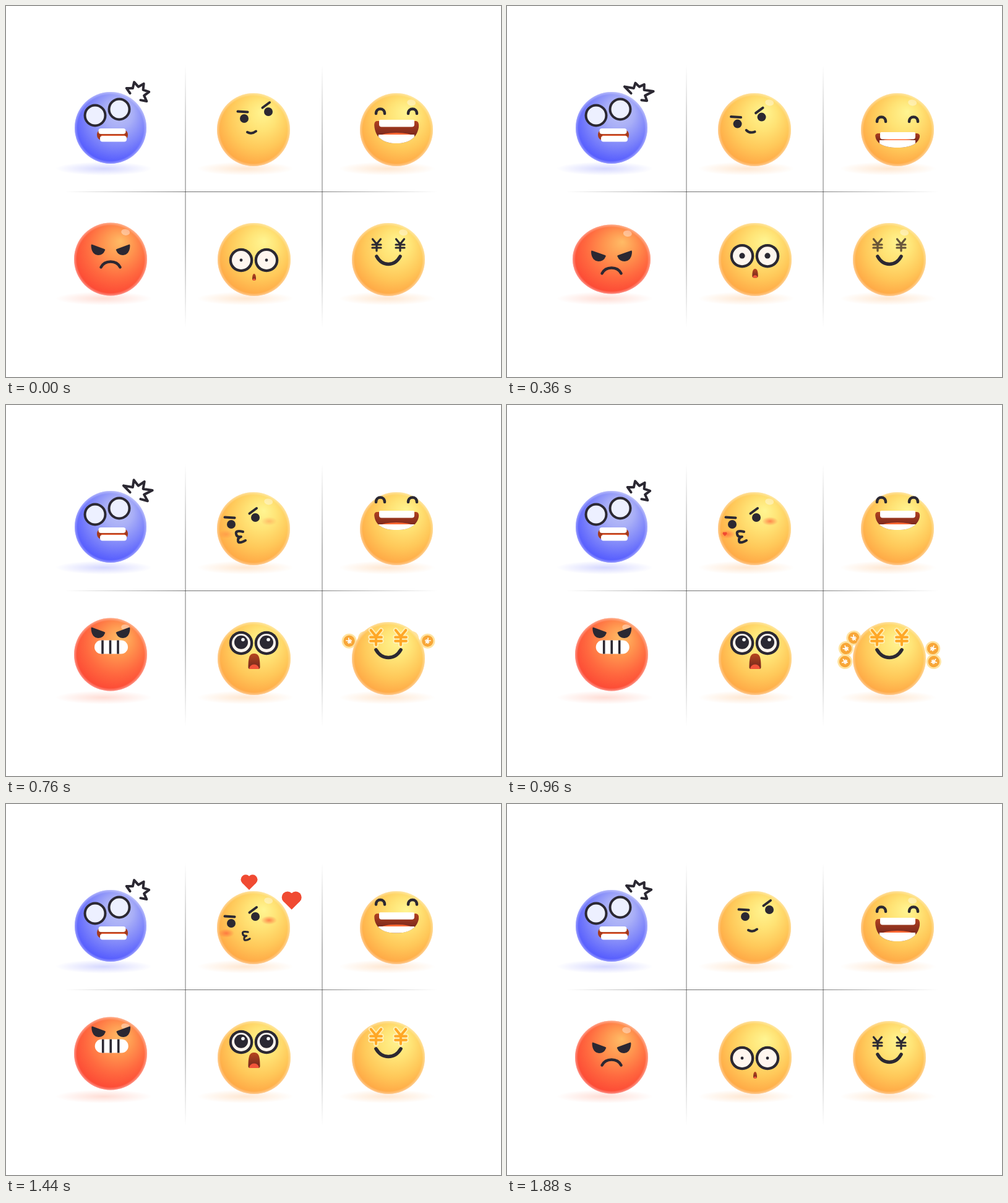
Recreate the animation shown at these times as an HTML page with a canvas. Size 800 px wide and 600 px high, loop 1.92 s.

```html
<!DOCTYPE html>
<html lang="en">
<head>
<meta charset="utf-8">
<title>Six moods</title>
<style>
html, body { margin: 0; width: 100%; height: 100%; overflow: hidden; background: #fff; }
canvas { display: block; width: 800px; height: 600px; }
</style>
</head>
<body>
<canvas id="stage" width="800" height="600"></canvas>
<script>
const ctx = document.getElementById('stage').getContext('2d');
const LOOP = 1920, STEP = 40, TAU = 2 * Math.PI, INK = '#2b2832', GOLD = '#ffa726';
const YELLOW = ['#fff592', '#ffe375', '#ffc859', '#ffa342'];
const BLUE = ['#c0c5f6', '#a8aef7', '#7d84fa', '#4d54ff'];
const RED = ['#ffbc66', '#ff954f', '#ff693f', '#fc4433'];

// Smooth step from 0 at time a to 1 at time b.
function ease(t, a, b) {
  const p = Math.min(1, Math.max(0, (t - a) / (b - a)));
  return p * p * (3 - 2 * p);
}
const pulse = (t, a, b, c, d) => ease(t, a, b) - ease(t, c, d);
const mix = (a, b, p) => a + (b - a) * p;

function at(x, y, draw, { rot = 0, sx = 1, sy = sx, alpha = 1 } = {}) {
  if (alpha <= 0) return;
  ctx.save();
  ctx.translate(x, y);
  ctx.rotate(rot);
  ctx.scale(sx, sy);
  ctx.globalAlpha *= alpha;
  draw();
  ctx.restore();
}

function fill(d, color) {
  ctx.fillStyle = color;
  ctx.fill(new Path2D(d));
}

function line(d, width = 4, color = INK) {
  ctx.lineCap = ctx.lineJoin = 'round';
  ctx.lineWidth = width;
  ctx.strokeStyle = color;
  ctx.stroke(new Path2D(d));
}

function oval(x, y, rx, ry, color, rot = 0) {
  ctx.beginPath();
  ctx.ellipse(x, y, rx, ry, rot, 0, TAU);
  ctx.fillStyle = color;
  ctx.fill();
}

const dot = (x, y, r, color) => oval(x, y, r, r, color);

function box(x, y, w, h, r, color) {
  ctx.beginPath();
  ctx.roundRect(x, y, w, h, r);
  ctx.fillStyle = color;
  ctx.fill();
}

function shade(gradient, ...colors) {
  colors.forEach((c, i) => gradient.addColorStop(i / (colors.length - 1), c));
  return gradient;
}

const down = (top, end, ...colors) => shade(ctx.createLinearGradient(0, top, 0, end), ...colors);

function clipped(d, color, draw) {
  ctx.save();
  fill(d, color);
  ctx.clip(new Path2D(d));
  draw();
  ctx.restore();
}

function glow(x, y, rx, ry, rgb, alpha) {
  at(x, y, () => dot(0, 0, 1, shade(ctx.createRadialGradient(0, 0, 0, 0, 0, 1),
    `rgba(${rgb},${alpha})`, `rgba(${rgb},${alpha / 2})`, `rgba(${rgb},0)`)), { sx: rx, sy: ry });
}

function ball(x, y, colors, { rx = 59, ry = rx, shine = 0 } = {}) {
  at(x, y, () => {
    dot(0, 0, 1, shade(ctx.createRadialGradient(.28, -.5, 0, .1, -.2, 1.25), ...colors));
    // A pale rim softens the edge.
    dot(0, 0, 1, shade(ctx.createRadialGradient(0, 0, .92, 0, 0, 1), 'rgba(255,255,255,0)', 'rgba(255,255,255,.4)'));
  }, { sx: rx, sy: ry });
  oval(x + rx * .41, y - ry * .74, 7, 5, `rgba(255,255,255,${shine * .38})`, .15);
}

function grid() {
  const clear = 'rgba(40,40,40,0)', dark = 'rgba(40,40,40,.65)';
  const rule = (x, y, length, rot) => at(x, y, () => {
    ctx.fillStyle = shade(ctx.createLinearGradient(0, 0, length, 0), clear, dark, dark, clear);
    ctx.fillRect(0, -.5, length, 1);
  }, { rot });
  rule(95, 300.5, 602, 0);
  rule(290, 95, 425, TAU / 4);
  rule(511, 95, 425, TAU / 4);
}

function burst(t) {
  const pts = [];
  for (let i = 0; i < 11; i++) {
    const tip = i >> 1, a = (184 + 23.8 * i) * TAU / 360;
    const beat = Math.cos(TAU * (t / 480 - (tip % 3 ? 1 : 2) / 3));
    const r = i % 2 ? 21.5 + 4 * beat : 11.5;
    pts.push(212 + r * Math.cos(a), 142 + r * Math.sin(a));
  }
  line('M' + pts.join(' '));
}

function dizzy(t) {
  ball(169, 197, BLUE, { rx: 58 });
  for (const [x, y] of [[144, 177], [183, 167]]) {
    dot(x, y, 18.5, INK);
    dot(x, y, 14.5, '#edf0ff');
  }
  box(147, 200, 50, 17, 8, '#a43a1c');
  box(154, 208, 38, 3, 1, '#d9532a');
  box(149.5, 198, 44, 9, 4, '#fff');
  box(152, 210, 43, 9.5, 4, '#fff');
  burst(t);
}

function heart(x, y, w) {
  at(x, y, () => {
    const color = '#f04a32';
    dot(-.207, -.147, .293, color);
    dot(.207, -.147, .293, color);
    fill('M0 -.354L.414 .06L0 .474L-.414 .06Z', color);
  }, { sx: w });
}

// Two hearts leave the lips and circle the face, speeding up, then slip behind it.
function hearts(t, behind) {
  for (const [delay, size] of [[0, 32], [155, 27]]) {
    const u = t - 965 - delay;
    if (u < -120 || u > 720 || (u > 520) !== behind) continue;
    const a = (171 + .23 * u + .000195 * u * u) * TAU / 360;
    const hide = 1 - ease(u, 640, 720);
    const r = mix(43, 76, ease(u, -150, 400)) * mix(.4, 1, hide);
    heart(400 + r * Math.cos(a), 200 + r * Math.sin(a), size * ease(u, -120, 260) * hide);
  }
}

function kiss(t) {
  hearts(t, true);
  ball(400, 200, YELLOW, { shine: pulse(t, 120, 340, 1460, 1640) });
  const blush = .8 * pulse(t, 560, 1000, 1440, 1680);
  for (const [x, y] of [[425, 188], [356, 209]]) glow(x, y, 13, 7, '255,105,60', blush);

  const turn = pulse(t, 180, 500, 1440, 1600), dip = pulse(t, 130, 460, 1440, 1720);
  at(385 - 21 * turn, 182 + 11 * dip, () => {
    dot(0, 0, 7, INK);
    dot(39, -11, 7, INK);
    line('M-10.5 -11.5L5.5 -10.5M29.5 -17.5L41 -26');
  });
  if (t >= 480 && t < 1560) {
    at(379 + 9 * ease(t, 1200, 1440), 214, () =>
      line('M4 -9Q-9 -12 -7 -5Q-6 0 1 -1Q-5 1 -4 6Q-3 11 8 5'),
      { sx: mix(.5, 1, pulse(t, 480, 640, 1200, 1700)) });
  } else {
    const bend = t < 480 ? turn : 0;
    at(397 - 6 * bend, 204 - 2 * bend, () => line('M-7 0Q0 4 7 -1.5'),
      { rot: .5 * bend, alpha: 1 - pulse(t, 400, 480, 1540, 1680) });
  }
  hearts(t, false);
}

function laugh(t) {
  const shut = pulse(t, 60, 340, 400, 680), lift = pulse(t, 400, 680, 1240, 1760);
  ball(631, 200, YELLOW, { shine: 1 - lift });
  const eyes = 13 * shut - 17 * lift;
  at(605, 174 + eyes, () => line('M-7 0C-7 -10 7 -10 7 0M45 0C45 -10 59 -10 59 0', 4.5));

  const top = 184 + 20 * shut - 13 * lift, end = 222 + 7 * shut - 20 * lift;
  const bite = 208 + 9 * shut - 15 * lift, side = mix(top, end, .32), low = mix(top, end, .8);
  const mouth = `M599 ${top + 2}H663Q668 ${top + 3} 667 ${side}C664 ${low} 650 ${end} 631 ${end}S598 ${low} 595.5 ${side}Q594 ${top + 3} 599 ${top + 2}Z`;
  clipped(mouth, down(top, bite, '#b54320', '#7e2a1e'), () => {
    oval(631, bite + 2, 25, 5, '#ff6a35');
    fill(`M602 ${bite}H660Q652 ${end} 631 ${end}T602 ${bite}Z`, '#fff');
    fill(`M602 ${bite}H660V${end}H602Z`, '#fff');
  });
  box(603, top, 57, 11.5, [2, 2, 4, 4], '#fff');
}

function angry(t) {
  const squash = pulse(t, 120, 340, 400, 540), rage = pulse(t, 420, 600, 1640, 1840);
  ball(169, 409.5 - 6 * rage, RED, { rx: 59 + 4 * squash, ry: 59 - 3 * squash, shine: 1 });
  const x = 169 - 1.4 * rage * Math.cos(TAU * (t - 1120) / 96);
  at(x, 387 + 10 * squash - 26 * rage, () => {
    for (const side of [1, -1])
      at(0, 0, () => fill('M-31 -.5Q-32 -2 -29 -1L-10 6Q-8 7 -9 8Q-12 16 -20 16Q-31 15 -31.5 0Z', INK),
        { sx: side * (1 + .05 * squash), sy: 1 });
    if (rage < .5) line('M-15.5 35.5Q-11 26.5 0 26.5T15.5 35.5', 4.5);
  });
  if (rage >= .5) {
    const h = 22 * pulse(t, 440, 620, 1480, 1840);
    at(x + 1, 391.5, () => {
      box(-27, -h / 2, 54, h, h / 2, '#fff');
      for (let bar = -1; bar < 2; bar++) box(12.5 * bar - 3.3, -h / 2, 3.6, h, 0, INK);
    });
  }
}

function shock(t) {
  ball(401, 410, YELLOW);
  const open = pulse(t, 200, 680, 1440, 1800), eye = 411 - 26 * open;
  for (const x of [380, 421]) {
    dot(x, eye, 19.3, INK);
    dot(x, eye, 15, '#fff6ef');
    dot(x, eye - 1.2 * open, 2.4 + 8.6 * open, INK);
    dot(x + 3, eye - 5.5, 2.8 * ease(open, .6, 1), '#fff');
  }
  const r = 3 + 6.5 * open, top = 433 - 31 * open, h = 11 + 14 * open;
  at(401, top, () => {
    const mouth = `M${-r} ${h - 3}C${-r} 4 ${-r * .7} 0 0 0S${r} 4 ${r} ${h - 3}Q${r} ${h} ${r - 3} ${h}H${3 - r}Q${-r} ${h} ${-r} ${h - 3}Z`;
    clipped(mouth, down(0, h, '#b8461f', '#6e251d'), () => oval(0, h, r * .85, h * .3, '#f1543a'));
  });
}

const YEN = 'M-6.5 -9L0 -1L6.5 -9M0 -1V10M-7 0H7M-7 5H7';

function coin(x, y, rot, alpha) {
  at(x, y, () => {
    dot(0, 0, 12, '#ffe3a0');
    dot(0, 0, 9.2, '#f8a637');
    at(0, 0, () => line(YEN, 4, '#fff'), { sx: .42 });
  }, { rot, alpha });
}

// Coins slide out from behind the head, alternating sides, and roll down around it.
function coins(t) {
  for (let n = 0; n < 5; n++) {
    const side = n % 2 ? 1 : -1, i = n >> 1;
    const start = 580 + 110 * i, end = 1180 + 100 * i;
    if (t < start || t > end) continue;
    const a = (24 + 17 * i - .14 * (t - 760)) * TAU / 360;
    const r = mix(42, 72, ease(t, start, start + 220));
    coin(618 + side * r * Math.cos(a), 410 - r * Math.sin(a), side * (1.2 - a), 1 - ease(t, end - 120, end));
  }
}

function rich(t) {
  coins(t);
  const up = pulse(t, 380, 600, 1620, 1800), gold = pulse(t, 300, 540, 1580, 1780);
  ball(618, 410, YELLOW, { shine: 1 - up });
  for (const side of [-1, 1]) {
    at(618 + side * (19 + up), 386 - 10.5 * up, () => {
      for (const [width, color, alpha] of [[6.2, '#fff3c4', .8 * ease(gold, .5, 1)], [3.2, INK, 1 - gold], [3.2, GOLD, gold]])
        at(0, 0, () => line(YEN, width, color), { alpha });
    }, { sx: 1 + .26 * up });
  }
  at(618, 405 - 9 * up, () => line('M-19 0Q-12 12.5 0 12.5T19 0', 5.5), { sx: 1 + .05 * up, sy: 1 });
}

const FACES = [dizzy, kiss, laugh, angry, shock, rich];
const SHADOWS = { dizzy: '150,155,255', angry: '255,170,150' };

function render(t) {
  ctx.fillStyle = '#fff';
  ctx.fillRect(0, 0, 800, 600);
  grid();
  FACES.forEach((face, i) => {
    glow(158 + i % 3 * 229, i < 3 ? 263 : 473, 78, 11, SHADOWS[face.name] || '255,195,140', .4);
    face(t);
  });
}

const begin = performance.now();
function tick() {
  const t = (performance.now() - begin) % LOOP;
  render(Math.floor(t / STEP) * STEP);
  requestAnimationFrame(tick);
}
tick();
</script>
</body>
</html>
```
